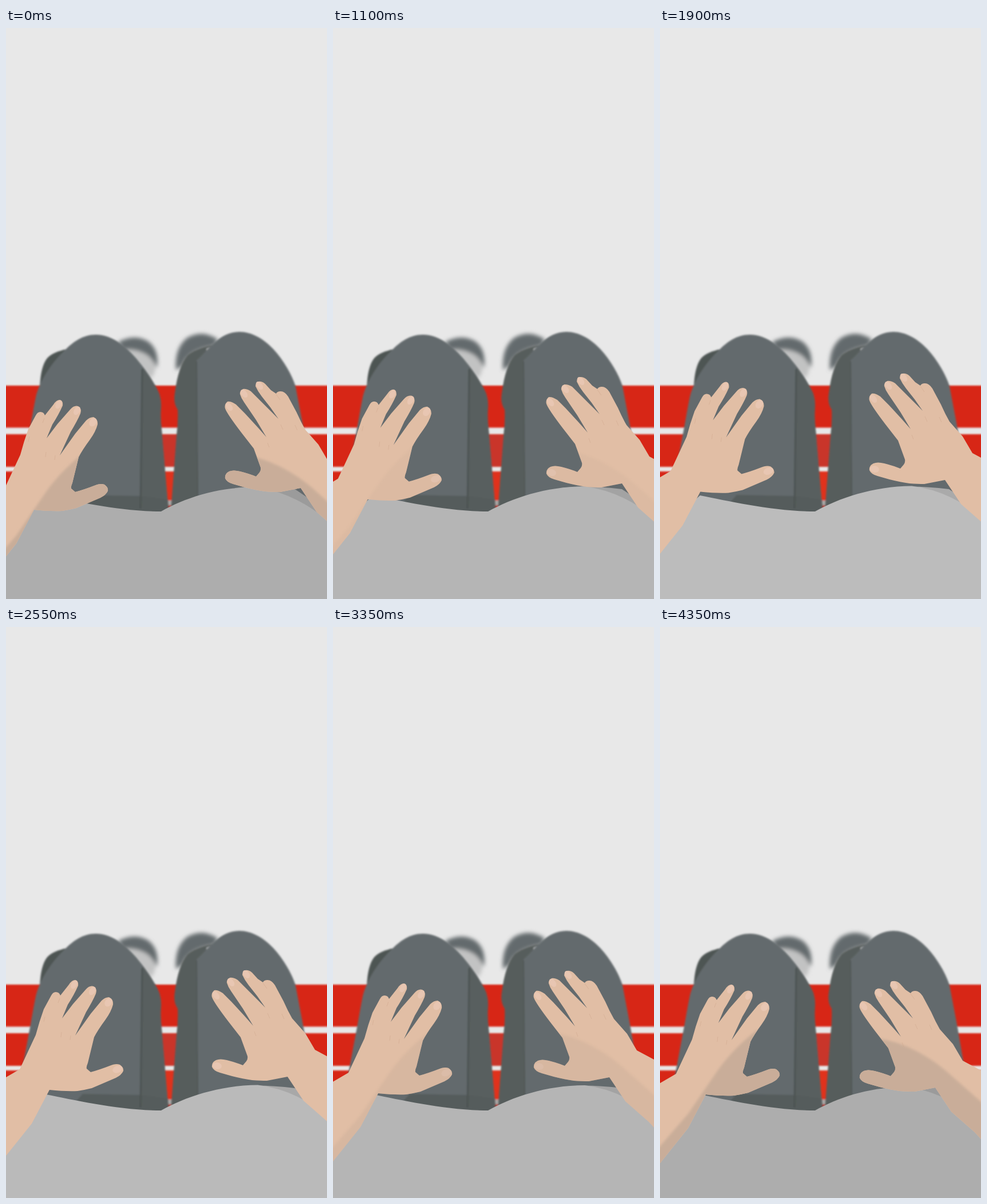
Animation of 561x998 px, one loop 4.6 s. Source, as an HTML page:

```html
<!DOCTYPE html>
<html lang="en">
<head>
<meta charset="utf-8">
<title>Breathing, seated</title>
<style>
html, body { margin: 0; width: 100%; height: 100%; overflow: hidden; background: #e8e8e8; }
svg { display: block; width: 100vw; height: 100vh; }
.skin { fill: #e1bea5; }
.nail { fill: #e8c6b2; }
.crease { fill: none; stroke: #cfa88f; stroke-width: 1; opacity: .55; }
.shade { fill: #c9ad99; }
</style>
</head>
<body>
<svg viewBox="0 0 561 998" preserveAspectRatio="none">
  <defs>
    <filter id="edge" x="-10%" y="-10%" width="120%" height="120%"><feGaussianBlur stdDeviation="1.5"/></filter>
    <filter id="soft" x="-50%" y="-50%" width="200%" height="200%"><feGaussianBlur stdDeviation="3.6"/></filter>
    <filter id="shadeBlur"><feGaussianBlur stdDeviation="2"/></filter>
    <path id="leftShape" d="M-60 822 L24 773 L52 713 Q58 690 66 668 L79 644 Q82 638 87 638 Q93 638 95 644 L110 625
      Q115 617 121 617 Q127 618 126 627 Q119 643 108 660 L98 684 L117 659 L139 634 Q146 626 153 628 Q160 632 157 641
      Q152 653 140 673 L121 714 L148 676 L167 653 Q173 647 180 647 Q188 651 187 660 Q184 672 174 686
      Q160 705 154 717 L143 762 Q140 769 141 772 L148 778 Q163 774 181 767 Q192 762 199 765 Q206 770 205 776
      Q202 783 192 788 L150 806 Q138 809 125 811 Q105 812 76 809 L45 868 L-55 993Z"/>
    <path id="rightShape" d="M640 792 L540 739 L523 710 L500 684 Q492 670 485 654 L470 626 Q464 617 457 617 Q451 617 449 621
      L440 615 L430 604 Q424 599 418 600 Q413 602 413 608 Q417 617 424 626 L439 645 L453 665 L443 655 L425 637 L405 617
      Q397 612 391 613 Q385 617 386 622 Q388 629 393 636 L414 667 L432 697 L417 680 L394 655 L379 640 Q370 634 364 635
      Q358 640 360 647 Q363 656 389 690 L410 717 L422 750 Q423 755 420 759 L414 766 Q402 761 386 757
      Q374 754 367 757 Q359 761 360 769 Q363 776 374 779 L395 785 Q415 790 430 792 Q445 793 456 793
      L492 786 L520 828 L561 864 L640 950Z"/>
    <clipPath id="leftClip"><use href="#leftShape"/></clipPath>
    <clipPath id="rightClip"><use href="#rightShape"/></clipPath>
  </defs>

  <rect width="561" height="998" fill="#e8e8e8"/>

  <g id="bench" filter="url(#edge)" fill="#d72713">
    <rect x="-9" y="625" width="579" height="73.5"/>
    <rect x="-9" y="710" width="579" height="57"/>
    <rect x="-9" y="775" width="579" height="51"/>
    <path d="M268 711H304V767H268Z" fill="#c9342a"/>
    <path d="M268 775H304V826H268Z" fill="#e0331d"/>
    <path d="M268 826H304V834H268Z" fill="#aaa7a6"/>
    <path d="M268 834H304V870H268Z" fill="#b63b30"/>
  </g>

  <g id="shoes" filter="url(#soft)">
    <path d="M205 558Q245 556 262 584Q262 604 253 613L232 590Z" fill="#c2c3c3"/>
    <path d="M196 549Q226 533 250 549Q268 564 264 594Q254 573 238 567Q221 560 205 563Z" fill="#646a6d"/>
    <path d="M308 594Q316 564 362 554L330 585Z" fill="#bfc0c0"/>
    <path d="M370 544Q342 526 316 542Q294 560 297 598L309 590Q318 564 364 556Z" fill="#646a6d"/>
  </g>

  <g id="legs" filter="url(#edge)">
    <path d="M108 561Q82 566 72 577Q60 592 59 630L90 620Z" fill="#4d5453"/>
    <path d="M157 536C134 536 117 549 103 563C82 583 59 615 52 645Q48 665 43 694L25 790L20 900H287L283 832L271 690
      Q269 675 271 657Q270 641 262 627Q252 608 237 589C214 559 187 536 157 536Z" fill="#646a6d"/>
    <path d="M238 592Q258 617 268 639Q272 652 271 664Q270 678 271 690L283 832L287 900H234V817Z" fill="#585f5e"/>
    <path d="M134 816L234 818L283 824L287 900H60Z" fill="#555c5b"/>
    <path d="M238 596L235 840" stroke="#4c5352" stroke-width="3"/>

    <path d="M365 553Q331 560 317 572Q301 591 295 638Q292 656 300 667Q301 690 298 712L289 832V900H350V560Z" fill="#565d5c"/>
    <path d="M333 581C352 565 372 531 408 531C429 531 450 543 467 561C485 580 500 607 506 626L512 658L520 700L532 770L560 900H337Z" fill="#646a6d"/>
    <path d="M333 583L335 840" stroke="#4f5655" stroke-width="2"/>
  </g>

  <path id="back" d="M400 804Q440 798 505 806L570 850V900H400Z"/>
  <path id="shirt"/>

  <g id="left">
    <use href="#leftShape" class="skin"/>
    <g class="nail">
      <ellipse cx="119" cy="625" rx="5" ry="8" transform="rotate(28 119 625)"/>
      <ellipse cx="151" cy="636" rx="5" ry="8" transform="rotate(32 151 636)"/>
      <ellipse cx="179" cy="656" rx="6" ry="8" transform="rotate(33 179 656)"/>
      <ellipse cx="195" cy="773" rx="9" ry="6" transform="rotate(-20 195 773)"/>
    </g>
    <g clip-path="url(#leftClip)"><path id="leftShade" class="shade" filter="url(#shadeBlur)"
      d="M165 706C134 730 110 756 92 783L45 852L-40 950V1010H230V706Z"/></g>
    <path class="crease" d="M68 681L66 690M97 708L96 717M113 714L112 722M94 649L91 657"/>
  </g>

  <g id="right">
    <use href="#rightShape" class="skin"/>
    <g class="nail">
      <ellipse cx="420" cy="607" rx="5" ry="8" transform="rotate(-38 420 607)"/>
      <ellipse cx="393" cy="621" rx="5" ry="8" transform="rotate(-38 393 621)"/>
      <ellipse cx="367" cy="644" rx="5" ry="8" transform="rotate(-38 367 644)"/>
      <ellipse cx="369" cy="767" rx="8" ry="6" transform="rotate(12 369 767)"/>
    </g>
    <g clip-path="url(#rightClip)"><path id="rightShade" class="shade" filter="url(#shadeBlur)"
      d="M340 698L403 702C452 712 494 741 519 764L650 880V1010H340Z"/></g>
    <path class="crease" d="M434 707L437 715M457 675L461 684M482 676L486 685M449 622L456 632"/>
  </g>
</svg>
<script>
const LOOP = 4600, STEP = 50, LAST = 4350;
const times = [0, 700, 1450, 1900, 2550, 3350, LAST];
const tracks = {
  leftX: [-27, -20, -11, -5.5, 0, 3, 4],
  leftY: [33, 21.5, 9, 1.5, 0, 6, 8],
  rightX: [23, 16.5, 10, 6, 0, -9, -11],
  rightY: [18, 13, 7.5, 4, 0, 1, 19],
  tone: [173, 178, 184, 188, 186, 181, 173],
  shade: [1, .5, 0, 0, 0, .4, 1],
  leftShadeY: [2, 4, 4, 4, 0, -4, -9],
  rightShadeY: [28, 28, 28, 28, 20, 8, 0],
  sag: [5, 3, 0, 0, 0, 1, 9]
};
const $ = id => document.getElementById(id);
const gray = v => `rgb(${v},${v},${v})`;

// Cubic Hermite through unevenly spaced keys
function sample(v, t) {
  const n = times.length - 1;
  let i = 0;
  while (i < n - 1 && t >= times[i + 1]) i++;
  const slope = k => {
    const a = Math.max(k - 1, 0), b = Math.min(k + 1, n);
    return (v[b] - v[a]) / (times[b] - times[a]);
  };
  const h = times[i + 1] - times[i], u = (t - times[i]) / h, w = 1 - u;
  return v[i] * w * w * (1 + 2 * u) + v[i + 1] * u * u * (3 - 2 * u)
    + h * (slope(i) * u * w * w - slope(i + 1) * u * u * w);
}

function draw(t) {
  const at = name => sample(tracks[name], t);
  const opacity = Math.min(1, Math.max(0, at('shade')));
  for (const side of ['left', 'right']) {
    $(side).setAttribute('transform', `translate(${at(side + 'X')} ${at(side + 'Y')})`);
    const shade = $(side + 'Shade');
    shade.setAttribute('transform', `translate(0 ${at(side + 'ShadeY')})`);
    shade.setAttribute('opacity', opacity);
  }

  const tone = Math.round(at('tone')), sag = at('sag');
  $('shirt').setAttribute('fill', gray(tone));
  $('back').setAttribute('fill', gray(tone - 18));
  $('shirt').setAttribute('d', `M70 817C120 827 200 845 271 845C312 822 372 801 440 ${800.5 + sag * .5}
    Q505 ${808 + sag} 561 ${855 + sag}V998H0V880Z`);
}

const start = performance.now();
function tick() {
  const t = (performance.now() - start) % LOOP;
  draw(Math.min(LAST, Math.floor(t / STEP) * STEP));
  requestAnimationFrame(tick);
}
tick();
</script>
</body>
</html>
```
